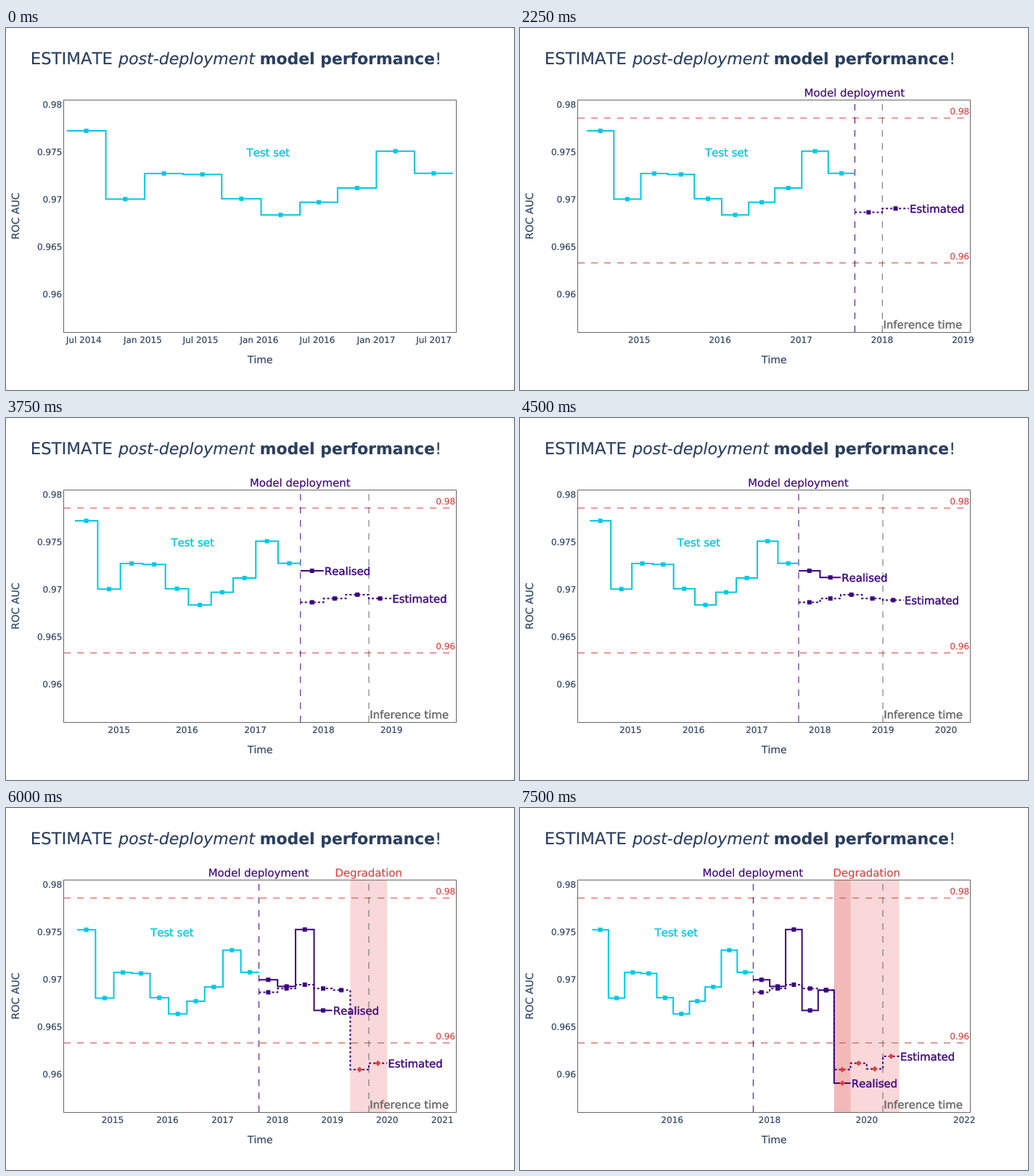
These frames come from a looping animation (700x500 px, 9.75 s). A matplotlib script:

```python
import numpy as np
import matplotlib.pyplot as plt
from matplotlib.animation import FuncAnimation
from matplotlib.patches import PathPatch, Rectangle, RegularPolygon
from matplotlib.textpath import TextPath
from matplotlib.transforms import Affine2D

W, H, DPI = 700, 500, 100
PT = 72 / DPI                      # points per pixel
LEFT, RIGHT, TOP, BOTTOM = 80, 620, 100, 420

NAVY, AQUA, PURPLE = "#2a3f5f", "#00c8e5", "#3b0280"
RED, GREY, FRAME = "#dd4040", "#666666", "#666666"

# Chunk borders in days since 2014-01-01
EDGES = np.array([
    128.94, 251.35, 373.0, 493.66, 614.3, 737.67, 859.47, 977.15, 1098.78, 1218.1,
    1338.15, 1462.04, 1581.57, 1704.66, 1825.43, 1945.46, 2069.02, 2190.4, 2311.5, 2435.1])
MIDS = (EDGES[:-1] + EDGES[1:]) / 2
N_TEST = 10
ALERT = 5                          # first degraded chunk after deployment

TEST = np.array([.97522, .96802, .97072, .97062, .96806,
                 .96635, .96769, .96919, .97307, .97074])
REALISED = np.array([.96995, .96925, .97525, .96672, .96886, .95905])
ESTIMATED = np.array([.96863, .96903, .96943, .96903, .96886,
                      .96048, .96115, .96055, .96188])
UPPER, LOWER = .97857, .96329
EARLY_LIFT = .002                  # performance level before degradation shows up

X0, X_LAST = 110.65, 589.3         # first and last marker of the test-only view
X_LINE, X_END = 500, 535.8         # room kept for the labels on the right
GAP = 2.7                          # between a line and the label beside it

plt.rcParams.update({"font.family": "DejaVu Sans", "text.kerning_factor": 6,
                     "toolbar": "None"})
fig = plt.figure(figsize=(W / DPI, H / DPI), dpi=DPI, facecolor="white")
ax = fig.add_axes([0, 0, 1, 1])


def ypos(v):
    return BOTTOM - (np.asarray(v) - .956) * 13100


def day(date):
    return (np.datetime64(date, "D") - np.datetime64("2014-01-01")).astype(float)


def scale(step):
    """Pixels per day, so that the newest labels still fit."""
    if step == 0:
        return (X_LAST - X0) / (MIDS[N_TEST - 1] - MIDS[0])
    start, end = EDGES[N_TEST + step - 1:N_TEST + step + 1] - MIDS[0]
    return min((X_LINE - X0) / start, (X_END - X0) / end)


def text(x, y, s, size, color=NAVY, align=.5, angle=0, stroke=.15, **font):
    """Outline text on baseline y; align 0, .5, 1 puts its left, middle, right at x."""
    path = TextPath((0, 0), s, size=size, prop=font)
    box = path.get_extents()
    place = (Affine2D().translate(-box.x0 - align * box.width, 0).scale(1, -1)
             .rotate_deg(-angle).translate(x, y))
    ax.add_patch(PathPatch(place.transform_path(path), fc=color, ec=color,
                           lw=stroke * PT, zorder=6, snap=False))


def note(x, y, s, color, align=.5, stroke=.15):
    text(x, y, s, 14.9, color, align, stroke=stroke)


def line(xs, ys, color, width=1, dash=None, z=3):
    style = (0, (dash / width, dash / width)) if dash else "-"
    ax.plot(xs, ys, color=color, lw=width * PT, ls=style, zorder=z, snap=False,
            solid_capstyle="butt", dash_capstyle="butt",
            solid_joinstyle="miter", dash_joinstyle="miter")


def mark(x, y, color, alert):
    radius, turn = (3.9, 0) if alert else (3 * np.sqrt(2), np.pi / 4)
    ax.add_patch(RegularPolygon((x, y), 4, radius=radius, orientation=turn,
                                fc=RED if alert else color, lw=0, zorder=5, snap=False))


def steps(xpos, first, values, color, dash=None):
    n = len(values)
    ys = ypos(values)
    edges = xpos(EDGES[first:first + n + 1])
    line(np.repeat(edges, 2)[1:-1], np.repeat(ys, 2), color, 2, dash, 4)
    for i, (x, y) in enumerate(zip(xpos(MIDS[first:first + n]), ys), first):
        mark(x, y, color, i >= N_TEST + ALERT)
    return edges[-1], ys[-1]


def shade(x0, x1):
    ax.add_patch(Rectangle((x0, TOP), x1 - x0, BOTTOM - TOP, fc=RED, alpha=.2,
                           lw=0, zorder=1, snap=False))


def draw_base(xpos, px_per_day):
    text(36, 50, "ESTIMATE", 22.8, align=0)
    text(155, 50, "post-deployment", 22.1, align=0, style="italic")
    text(351.5, 50, "model performance", 21.9, align=0, weight="bold")
    text(594.6, 50, "!", 22, align=0)
    text(349.8, 463, "Time", 14)
    text(18, 259.5, "ROC AUC", 14, angle=90)

    ax.add_patch(Rectangle((79.5, 99.5), 541, 321, fill=False, ec=FRAME,
                           lw=PT, zorder=2, snap=False))
    for v in (.96, .965, .97, .975, .98):
        text(76.3, ypos(v) + 4.4, f"{v:g}", 12, align=1)

    rough = (RIGHT - LEFT) / px_per_day / 365.25 / 7.75
    months = 6 if rough < .5 else 12 if rough < 1 else 24
    for m in range(0, 120, months):
        date = np.datetime64("2014-01") + m
        x = xpos(day(date))
        if LEFT <= x <= RIGHT:
            name = ("Jul " if m % 12 else "Jan ") if months == 6 else ""
            text(x, 435, name + str(date)[:4], 12)


def draw_inference(xpos, step):
    for v, s in ((UPPER, "0.98"), (LOWER, "0.96")):
        y = ypos(v)
        line([LEFT, RIGHT], [y, y], RED, 1, 9)
        text(618.3, y - 5, s, 12, RED, 1)

    now = xpos(EDGES[N_TEST + step - 1])
    deploy = xpos(EDGES[N_TEST])
    if step > 1:
        line([now, now], [BOTTOM, TOP], GREY, 1, 9)
    line([deploy, deploy], [BOTTOM, TOP], PURPLE, 1, 9)
    note(deploy, 94.7, "Model deployment", PURPLE)
    note(now + GAP, 415, "Inference time", GREY, 0, .4)

    x, y = steps(xpos, N_TEST, ESTIMATED[:step], PURPLE, 3)
    note(x + GAP, y + 5.8, "Estimated", PURPLE, 0, .4)

    lift = EARLY_LIFT if step <= ALERT else 0
    known = max(step - 3, 0)
    if known:
        xr, yr = steps(xpos, N_TEST, REALISED[:known] + lift, PURPLE)
        note(xr + GAP, yr + 5.8, "Realised", PURPLE, 0, .4)
    if step > ALERT:
        bad = xpos(EDGES[N_TEST + ALERT])
        shade(bad, x)
        note((bad + x) / 2, 94.7, "Degradation", RED)
        if known > ALERT:
            shade(bad, xr)


def update(i):
    step = int(np.clip(i - 1, 0, 9))
    ax.clear()
    ax.set(xlim=(0, W), ylim=(H, 0))
    ax.axis("off")
    k = scale(step)

    def xpos(d):
        return X0 + k * (d - MIDS[0])

    draw_base(xpos, k)
    steps(xpos, 0, TEST + (EARLY_LIFT if step <= ALERT else 0), AQUA)
    note(xpos(759.3), 177.2, "Test set", AQUA, stroke=.4)
    if step:
        draw_inference(xpos, step)
    return []


anim = FuncAnimation(fig, update, frames=13, interval=750, init_func=lambda: [],
                     repeat=True, repeat_delay=0, blit=False)
plt.show()
```
